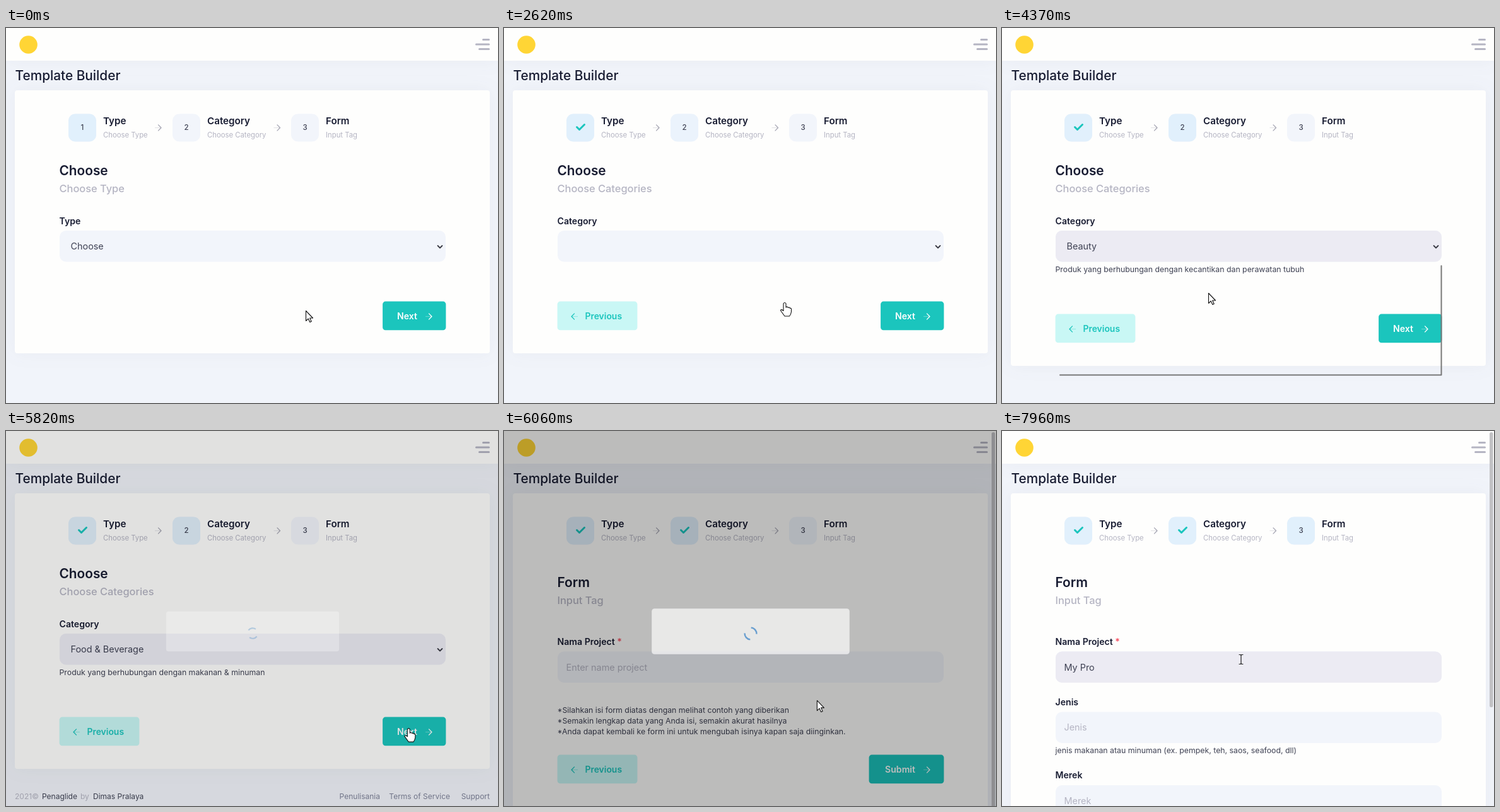
An HTML page that plays this animation: 780 px wide and 596 px high, repeating every 8000 ms.

```html
<!DOCTYPE html>
<html lang="en">
<head>
<meta charset="utf-8">
<title>Template Builder</title>
<style>
  html, body { margin: 0; width: 100%; height: 100%; overflow: hidden; background: #f1f4fa; }
  svg { display: block; width: 780px; height: 596px; font-family: Inter, "Open Sans", sans-serif; cursor: default; user-select: none; }
  .card { filter: drop-shadow(0 0 14px rgba(82, 75, 105, .05)); }
  .pop { filter: drop-shadow(1px 2px 2px rgba(0, 0, 0, .5)); }
</style>
</head>
<body>
<svg id="stage" viewBox="0 0 780 596"></svg>
<script>
const LOOP = 8000;
const WHITE = '#fefefd', INK = '#181c32', BODY = '#3f4254', MUTED = '#b5b5c3';
const TEAL = '#1bc5bd', FIELD = '#f2f5fb', FOCUS = '#ecebf3', ACTIVE = '#e1f0fc';
const ROW = 25, POP_TOP = 373;

const TYPES = ['Choose', 'Headline', 'Caption', 'Deskripsi'];
const CATEGORIES = ['Beauty', 'Food &amp; Beverage', 'Fashion', 'Health', 'Education', 'Property', 'Services'];

// Pointer track: time, x, y
const TRACK = [
  [30, 475, 449], [170, 433, 342], [560, 433, 342], [860, 363, 404], [1170, 363, 404],
  [1480, 445, 391], [1890, 445, 391], [2310, 650, 472], [2480, 650, 472], [2620, 445, 437],
  [3060, 430, 348], [3820, 430, 348], [4000, 327, 421], [4370, 327, 421], [4620, 444, 391],
  [5000, 444, 391], [5480, 650, 477], [5790, 650, 477], [5960, 517, 433], [6130, 484, 425], [6200, 379, 363]
];

const ramp = (t, a, b) => Math.max(0, Math.min(1, (t - a) / (b - a)));
const within = (t, a, b) => t >= a && t < b;

function pointer(t) {
  const i = TRACK.findIndex(k => k[0] > t);
  if (i === 0) return TRACK[0].slice(1);
  if (i < 0) return TRACK[TRACK.length - 1].slice(1);
  const [t0, x0, y0] = TRACK[i - 1], [t1, x1, y1] = TRACK[i];
  const p = ramp(t, t0, t1), e = p * p * (3 - 2 * p);
  return [x0 + (x1 - x0) * e, y0 + (y1 - y0) * e];
}

const text = (x, y, s, size, fill = INK, weight = 400, anchor = 'start') =>
  `<text x="${x}" y="${y}" font-size="${size}" fill="${fill}" font-weight="${weight}" text-anchor="${anchor}">${s}</text>`;
const box = (x, y, w, h, r, fill, extra = '') =>
  `<rect x="${x}" y="${y}" width="${w}" height="${h}" rx="${r}" fill="${fill}" ${extra}/>`;
const line = (d, color, width, extra = '') =>
  `<path d="${d}" fill="none" stroke="${color}" stroke-width="${width}" stroke-linejoin="round" ${extra || 'stroke-linecap="round"'}/>`;

const label = (y, s) => text(84.5, y, s, 14.1, INK, 600);
const hint = (y, s) => text(84.5, y, s, 12.3, BODY);
const heading = (y, title, sub) => text(84.5, y, title, 20.8, INK, 600) + text(84.5, y + 27, sub, 16.4, MUTED, 500);

function arrow(x, y, color, dir = 1) {
  return `<g transform="translate(${x} ${y}) scale(${dir} 1)">` +
    line('M-5 0H4', color, 1.2, 'opacity=".3"') + line('M0.5 -4.6L5 0L0.5 4.6', color, 1.3) + '</g>';
}

function field(y, focus = 0) {
  return box(85, y, 612, 49.5, 10, FIELD) + box(85, y, 612, 49.5, 10, FOCUS, `opacity="${focus}"`);
}

function select(value, focus) {
  return field(322, focus) + text(102.5, 352, value, 14.4, BODY) + line('M684.5 346L688 349.5L691.5 346', '#3a3b45', 1.8);
}

function popup(items, selected, y) {
  const hover = y > POP_TOP ? Math.floor((y - POP_TOP) / ROW) : selected;
  const rows = items.map((s, i) =>
    (i === hover ? box(86, POP_TOP + i * ROW, 610, ROW, 0, '#1e78e6') : '') +
    text(104, POP_TOP + 17.5 + i * ROW, s, 14.4, i === hover ? '#fff' : BODY)).join('');
  return box(85, 372, 612, items.length * ROW + 2, 0, FOCUS, 'class="pop"') + rows;
}

const plate = (x, y, w, fill) => box(x - .4, y - .4, w + .8, 45.6, 4.5, fill);

function button(x, y, w, s, hover) {
  return plate(x, y, w, hover ? '#0bb7af' : TEAL) +
    text(652, y + 28, s, 14.1, '#fff', 600, 'end') + arrow(670, y + 23.5, '#fff');
}

const previous = y => plate(85, y, 126, '#c9f7f5') +
  text(128.5, y + 28, 'Previous', 13.9, TEAL, 600) + arrow(112, y + 23.5, TEAL, -1);

function steps(t, step) {
  const lit = [1, ramp(t, 2480, 2780), ramp(t, 6050, 6120)];
  const items = [[99, 'Type', 'Choose Type'], [264, 'Category', 'Choose Category'], [452, 'Form', 'Input Tag']];
  return items.map(([x, title, desc], i) =>
    box(x, 136.5, 44, 44, 11, FIELD) + box(x, 136.5, 44, 44, 11, ACTIVE, `opacity="${lit[i]}"`) +
    (i + 1 < step
      ? line(`M${x + 16.5} 157.5l4 4l8 -8`, TEAL, 3)
      : text(x + 22, 162, i + 1, 11.5, BODY, 500, 'middle')) +
    text(x + 55, 153, title, 15.2, INK, 600) + text(x + 55, 174, desc, 11.3, MUTED)
  ).join('') + arrow(241, 158.5, '#a5a5b2') + arrow(429.5, 158.5, '#a5a5b2');
}

function typeStep(t, y) {
  const open = within(t, 470, 1170);
  return heading(234, 'Choose', 'Choose Type') + label(311.5, 'Type') +
    select(TYPES[t < 1170 ? 0 : 1], ramp(t, 440, 600)) +
    button(597.5, 435, 99.5, 'Next', within(t, 2200, 2480)) + (open ? popup(TYPES, 0, y) : '');
}

function categoryStep(t, y) {
  const loaded = t >= 2900, food = t >= 4410, by = loaded ? 455 : 435;
  const focus = ramp(t, 3510, 3650) * (1 - ramp(t, 5790, 5900));
  const note = food ? 'makanan &amp; minuman' : 'kecantikan dan perawatan tubuh';
  return heading(234, 'Choose', 'Choose Categories') + label(311.5, 'Category') +
    select(loaded ? CATEGORIES[+food] : '', focus) +
    (loaded ? hint(388, 'Produk yang berhubungan dengan ' + note) : '') +
    previous(by) + button(597.5, by, 99.5, 'Next', within(t, 5380, 5790)) +
    (within(t, 3530, 4370) ? popup(CATEGORIES, 0, y) : '') +
    (within(t, 4370, 4410) ? line('M696.5 378V551.5H92', '#777', 2) : '');
}

function formStep(t) {
  const typed = 'My Pro'.slice(0, t < 7410 ? 0 : 1 + Math.floor((t - 7410) / 110));
  const rest = t < 6170
    ? hint(448, '*Silahkan isi form diatas dengan melihat contoh yang diberikan') +
      hint(465, '*Semakin lengkap data yang Anda isi, semakin akurat hasilnya') +
      hint(482, '*Anda dapat kembali ke form ini untuk mengubah isinya kapan saja diinginkan.') +
      previous(515) + button(579, 515, 118, 'Submit')
    : label(435.5, 'Jenis') + field(446.5) + text(98.5, 476, 'Jenis', 14.4, MUTED) +
      hint(512, 'jenis makanan atau minuman (ex. pempek, teh, saos, seafood, dll)') +
      label(551.5, 'Merek') + field(563) + text(98.5, 592.5, 'Merek', 14.4, MUTED);
  return heading(248, 'Form', 'Input Tag') +
    label(340, 'Nama Project <tspan fill="#f64e60">*</tspan>') + field(350.5, ramp(t, 6820, 7000)) +
    text(98.5, 380.5, typed || 'Enter name project', 14.4, typed ? BODY : MUTED) + rest +
    box(773, 2, 5.5, t < 6170 ? 600 : 437, 2.5, '#c1c1c4');
}

function footer() {
  return text(14, 585, '2021©', 12, MUTED) + text(57, 585, 'Penaglide', 12, BODY) +
    text(118, 585, 'by', 12, MUTED) + text(138, 585, 'Dimas Pralaya', 12, BODY) +
    text(593, 585, 'Penulisania', 12, '#7e8299', 400, 'end') +
    text(704, 585, 'Terms of Service', 12, '#7e8299', 400, 'end') +
    text(767, 585, 'Support', 12, '#7e8299', 400, 'end');
}

function loader(t) {
  const show = ramp(t, 5790, 5900) * (1 - ramp(t, 6030, 6120));
  const scale = .7 + .3 * ramp(t, 5790, 5930) - .4 * ramp(t, 6030, 6130);
  const turn = 25 + (t - 5960) * .24;
  const fade = Math.max(show, .05);
  return box(0, 0, 780, 596, 0, '#000', `opacity="${.4 * show}"`) +
    `<g transform="translate(391 318.5) scale(${scale}) translate(-391 -318.5)">` +
    box(212, 277, 358, 83, 5, '#fff', `opacity="${show}"`) +
    line('M-7.6 -7.6A10.8 10.8 0 0 1 7.6 -7.6M7.6 7.6A10.8 10.8 0 0 1 -7.6 7.6', '#2778c4', 2.8,
      `opacity="${fade}" transform="translate(391 322.5) rotate(${turn})"`) + '</g>';
}

function cursor(t, x, y) {
  const hand = within(t, 2200, 2700) || within(t, 5380, 5850);
  const at = `<g transform="translate(${x} ${y})">`;
  if (t >= 6190) return at + line('M-3 -7.5H-1L0 -6.5L1 -7.5H3M0 -6.5V6.5M-3 7.5H-1L0 6.5L1 7.5H3', '#222', 1.2) + '</g>';
  const d = hand
    ? 'M-2 1Q0 -2 2 1V7Q4 5 5.5 7.5Q7.5 6 8.5 8.5Q10.5 7.5 10.5 10V14Q10 18 7.5 21H0Q-3 17 -6.5 12Q-6 9 -2 12.5Z'
    : 'M.5 .5V16.5L4.2 13L6.8 18.6L9.2 17.5L6.7 12H11.5Z';
  return at + `<path d="${d}" fill="#fff" stroke="#111" stroke-width="1.1" stroke-linejoin="round"/></g>`;
}

function scene(t) {
  const step = t < 2480 ? 1 : t < 6050 ? 2 : 3;
  const [x, y] = pointer(t);
  const bottom = step === 3 ? 640 : t < 2900 ? 517 : 537;
  return box(0, 0, 780, 596, 0, '#f1f4fa') +
    box(0, -10, 780, 62, 0, WHITE, 'class="card"') +
    '<circle cx="35.5" cy="26.5" r="14.3" fill="#ffd535"/>' +
    line('M756.5 18.5H765.5M745.5 26H765.5M750.5 33.5H765.5', MUTED, 3) +
    text(14.5, 83, 'Template Builder', 20.8, INK, 500) +
    box(14, 99, 753, bottom - 99, 4, WHITE, 'class="card"') +
    steps(t, step) +
    (step === 1 ? typeStep(t, y) : step === 2 ? categoryStep(t, y) : formStep(t)) +
    (within(t, 5790, 6050) ? footer() : '') +
    (within(t, 5790, 6170) ? loader(t) : '') +
    cursor(t, x, y);
}

const stage = document.getElementById('stage');
function frame() {
  stage.innerHTML = scene(performance.now() % LOOP);
  requestAnimationFrame(frame);
}
frame();
</script>
</body>
</html>
```
